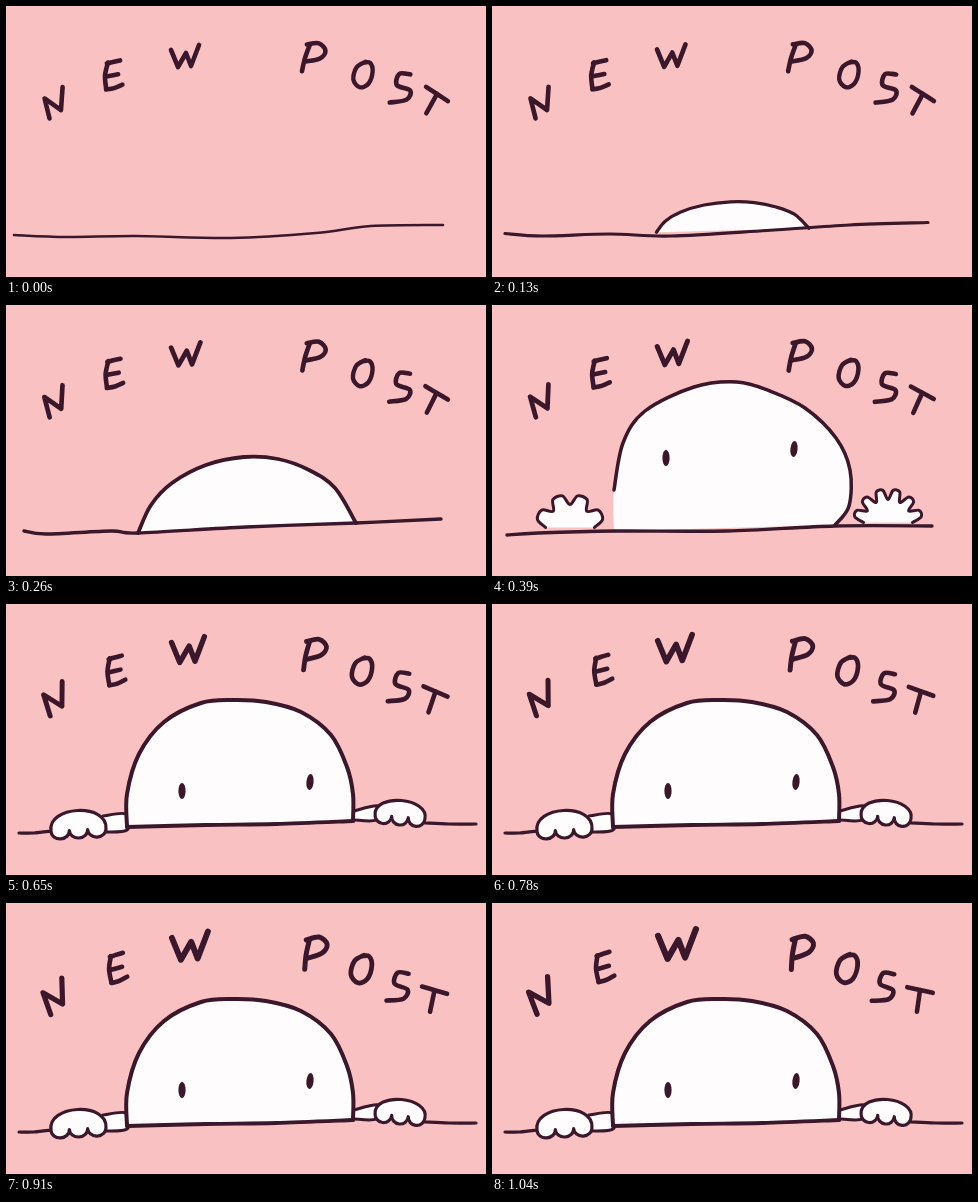
An HTML page for the animation above (1.17 s loop, 480x271 px).

```html
<!DOCTYPE html>
<html lang="en">
<head>
<meta charset="utf-8">
<title>New post</title>
<style>
  html, body { margin: 0; width: 100%; height: 100%; overflow: hidden; background: #fac1c2; }
  svg { display: block; width: 100%; height: 100%; }
  path, ellipse { fill: none; stroke: #3a172b; stroke-linecap: round; stroke-linejoin: round; }
  .white { fill: #fefcfd; }
  .eye { fill: #3a172b; stroke: none; }
  .cel {
    visibility: hidden;
    animation: show 1170ms step-end infinite;
    animation-delay: calc(var(--i) * 130ms);
  }
  @keyframes show {
    0% { visibility: visible; }
    11.1112%, 100% { visibility: hidden; }
  }
</style>
</head>
<body>
<svg id="stage" viewBox="0 0 480 271" role="img" aria-label="NEW POST"></svg>
<script>
const count = 9;
const mix = (a, b, t) => a + (b - a) * t;
const points = text => text.split(' ').map(s => s.split(',').map(Number));
const blend = (a, b, t) => a.map((p, i) => p.map((v, k) => mix(v, b[i][k], t)));

// Smooth curve through points
function curve(p) {
  let d = 'M' + p[0];
  for (let i = 0; i < p.length - 1; i++) {
    const a = p[i - 1] || p[i], b = p[i], c = p[i + 1], e = p[i + 2] || c;
    const c1 = b.map((v, k) => v + (c[k] - a[k]) / 6);
    const c2 = c.map((v, k) => v - (e[k] - b[k]) / 6);
    d += `C${c1} ${c2} ${c}`;
  }
  return d;
}

const path = (d, width, kind = '') => `<path d="${d}" stroke-width="${width}" class="${kind}"/>`;
const line = (p, width = 3.2) => path(curve(p), width);
const shape = (p, width = 3.8) => path(curve(p), width, 'white');
const eye = ([x, y], tilt) =>
  `<ellipse class="eye" cx="${x}" cy="${y}" rx="3.6" ry="8" transform="rotate(${tilt} ${x} ${y})"/>`;

// Each letter has brush strokes ("!" keeps corners) and two poses: x, y, turn, size
const letters = [
  { strokes: '!-2,16 -10,-3 8,6 6,-17', from: [48, 97, 9, 1], to: [48, 93, 2, 1.15] },
  { strokes: '-6,-13 -8,0 -6,13/-7,-12 -1,-14 6,-16/-7,1 5,-2/-6,14 2,12 10,8', from: [107, 70, 4, 1], to: [112, 65, -2, 1] },
  { strokes: '!-14,-6 -7,11 1,-3 6,10 14,-11', from: [179, 50, 0, 1], to: [185, 41, 0, 1.35] },
  { strokes: '-5,-12 -9,2 -11,15/-8,-12 4,-14 11,-7 6,1 -8,5', from: [308, 51, 4, 1], to: [310, 49, -5, 1.1] },
  { strokes: '2,-14 -7,-8 -10,5 -3,13 6,9 10,-4 7,-13 0,-13', from: [357, 69, 2, 0.95], to: [355, 66, 2, 1.05] },
  { strokes: '12,-13 1,-14 -2,-3 11,3 7,12 -10,14', from: [393, 82, -3, 1], to: [390, 84, 1, 1] },
  { strokes: '-13,-1 0,0 13,1/0,0 0,22', from: [431, 88, 29, 1], to: [428, 87, 8, 1] }
];

function lettering(i) {
  const t = (i / (count - 1)) ** 1.5;
  return letters.map(({ strokes, from, to }) => {
    const [x, y, turn, size] = from.map((v, k) => mix(v, to[k], t));
    const ink = strokes.split('/').map(s =>
      s[0] === '!' ? path('M' + s.slice(1), 4.6) : line(points(s), 4.6)).join('');
    return `<g transform="translate(${x} ${y}) rotate(${turn}) scale(${size})">${ink}</g>`;
  }).join('');
}

// Open hand: fingers fanned around a palm
function hand(x, y, fingers, reach) {
  const p = [];
  for (let k = 0; k <= fingers; k++) {
    for (const [step, r] of [[0, 0.72], [0.3, 1], [0.7, 1]]) {
      if (k === fingers && step) break;
      const a = mix(1.02, 1.98, (k + step) / fingers) * Math.PI;
      p.push([x + reach * r * Math.cos(a), y + reach * r * Math.sin(a)]);
    }
  }
  return shape(p, 3);
}

// Gripping hand: rounded back above a row of knuckles
function fist(x, y, width, height, tilt) {
  const w = width / 3;
  const knuckle = `a${w / 2},8 0 0 1 ${-w},0`;
  const d = `M${x},${y}c-3,${-height * 1.3} ${width + 3},${-height * 1.3} ${width},0` + knuckle.repeat(3);
  return `<g transform="rotate(${tilt} ${x + width / 2} ${y})">${path(d, 3.2, 'white')}</g>`;
}

const flat = points('8,229 60,231 130,230 225,232 310,227 365,220 437,219');
const tilted = points('18,226 40,229 105,226 132,228 240,222 350,218 435,214');
const dome = points('132,228 145,200 166,178 200,160 238,152 272,154 303,165 329,183 350,218');
const bump = dome.map(([x, y]) => [mix(240, x, 0.7), mix(225, y, 0.4)]);
const tall = points('122,226 122,185 131,138 153,106 202,82 245,77 278,86 313,103 344,133 358,165 357,201 343,220');
const low = points('121,223 121,190 133,150 158,118 195,99 227,96 260,98 295,108 325,131 341,163 347,190 347,217');
const highEyes = [[174, 153], [302, 144]];
const lowEyes = [[176, 187], [304, 178]];

const face = ([left, right]) => eye(left, 0) + eye(right, 6);

const gripping = (body, eyes) =>
  shape(points('97,212 120,210 121,226 97,228'), 3) +
  shape(points('348,207 372,202 370,216 348,216'), 3) +
  shape(body, 4) + line(points('121,223 200,221 270,220 347,217'), 3.8) + face(eyes) +
  line(points('13,229 28,229 46,227')) + line(points('419,219 443,220 470,220')) +
  fist(45, 226, 55, 20, -3) + fist(369, 213, 50, 17, 5);

const grip = gripping(low, lowEyes);
const scenes = [
  line(flat, 2.6),
  shape(bump, 3.3) + line(blend(flat, tilted, 0.5)),
  shape(dome) + line(tilted, 3.4),
  shape(tall, 0) + line(tall.slice(1), 3.5) + face(highEyes) +
    hand(78, 224, 4, 34) + hand(396, 219, 6, 34) +
    line(points('15,230 46,228 122,226 235,226 343,221 440,221'), 3.4),
  gripping(blend(tall, low, 0.5), blend(highEyes, lowEyes, 0.5))
];

let html = '';
for (let i = 0; i < count; i++) {
  html += `<g class="cel" style="--i:${i}">${scenes[i] || grip}${lettering(i)}</g>`;
}
stage.innerHTML = html;
</script>
</body>
</html>
```
